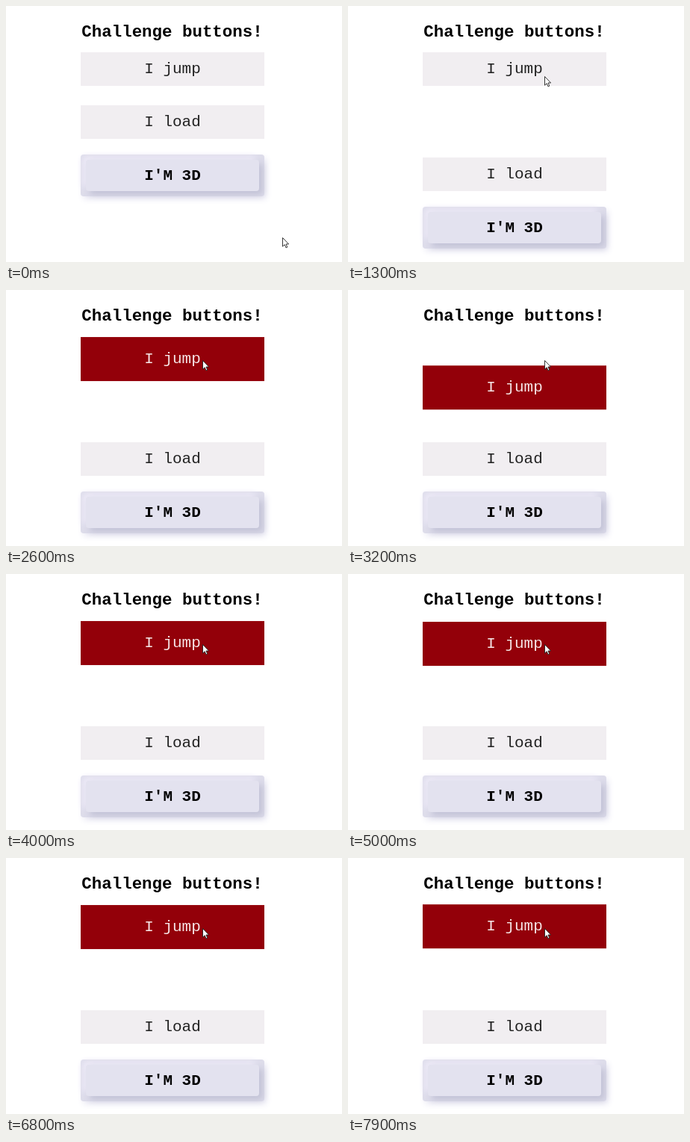
An HTML page for the animation above (8 s loop, 450 px wide and 343 px high).

```html
<!DOCTYPE html>
<html lang="en">
<head>
<meta charset="utf-8">
<title>Challenge buttons</title>
<style>
  html, body { margin: 0; width: 100%; height: 100%; overflow: hidden; background: #fff; }
  body { position: relative; font: 21px "Courier New", "Liberation Mono", monospace; color: #222; }
  body > * { position: absolute; }
  h1 { margin: 0; left: 0; width: 445px; top: 22px; line-height: 26px; text-align: center; font-size: 22.45px; color: #000; }
  .button { left: 100px; width: 246px; height: 45px; line-height: 46px; text-align: center; background: #f1eef1; }
  #jump { top: 62px; }
  #jump.active { height: 59px; line-height: 60px; background: #930009; color: #f6e4e6; }
  #load { top: 132.5px; }
  #solid { top: 199px; height: 56px; border-radius: 4px; background: #dddcea; color: #000; font-weight: bold;
    box-shadow: 3px 4px 9px #e9e8f3; }
  #solid span { position: absolute; inset: 7px; line-height: 43px; border-radius: 4px; background: #e3e2ef;
    box-shadow: 5px 5px 8px #c2c2d6, -5px -5px 8px #edeaf7; }
  #cursor { left: 0; top: 0; }
</style>
</head>
<body>
<h1>Challenge buttons!</h1>
<div class="button" id="jump">I jump</div>
<div class="button" id="load">I load</div>
<div class="button" id="solid"><span>I'M 3D</span></div>
<svg id="cursor" width="11" height="16">
  <path d="M.5 .5V12.2L3.2 9.7L5 13.9L6.8 13.1L5 9H8.6Z" fill="#fff" stroke="#222" stroke-width=".9"/>
</svg>
<script>
  const LOOP = 8000, STEP = 100;
  const HOVER_AT = 880, HOVER_TIME = 500, PUSH = 71;
  const JUMP_AT = 1550, JUMP_PERIOD = 1400, JUMP_TOP_AT = 2418, JUMP_DROP = 42;
  // time, x, y of the pointer
  const path = [
    [0, 370, 310], [100, 388, 265], [200, 440, 60], [300, 470, 20],
    [600, 470, 60], [700, 426, 68], [800, 380, 78], [900, 322, 88], [1000, 280, 93], [1100, 263, 94]
  ];
  const [jump, load, solid, cursor] = ["jump", "load", "solid", "cursor"].map(id => document.getElementById(id));
  const clamp = v => Math.min(1, Math.max(0, v));
  const shift = (el, x, y) => el.style.transform = `translate(${x}px, ${y}px)`;

  // CSS "ease": cubic-bezier(.25, .1, .25, 1)
  function ease(x) {
    const bezier = (s, a, b) => 3 * s * (1 - s) ** 2 * a + 3 * s * s * (1 - s) * b + s ** 3;
    let low = 0, high = 1;
    for (let i = 0; i < 20; i++) {
      const mid = (low + high) / 2;
      if (bezier(mid, .25, .25) < x) low = mid; else high = mid;
    }
    return bezier(low, .1, 1);
  }

  function pointer(t) {
    const next = path.findIndex(p => p[0] > t);
    if (next < 0) return path[path.length - 1].slice(1);
    const a = path[next - 1], b = path[next], k = (t - a[0]) / (b[0] - a[0]);
    return [a[1] + (b[1] - a[1]) * k, a[2] + (b[2] - a[2]) * k];
  }

  function draw(now) {
    const t = Math.floor(now % LOOP / STEP) * STEP;
    const push = PUSH * ease(clamp((t - HOVER_AT) / HOVER_TIME));
    const active = t >= JUMP_AT;
    const swing = (1 - Math.cos((t - JUMP_TOP_AT) / JUMP_PERIOD * 2 * Math.PI)) / 2;
    jump.classList.toggle("active", active);
    shift(jump, 0, active ? JUMP_DROP * swing ** 2 : 0);
    shift(load, 0, push);
    shift(solid, 0, push);
    shift(cursor, ...pointer(t));
    requestAnimationFrame(draw);
  }
  requestAnimationFrame(draw);
</script>
</body>
</html>
```
